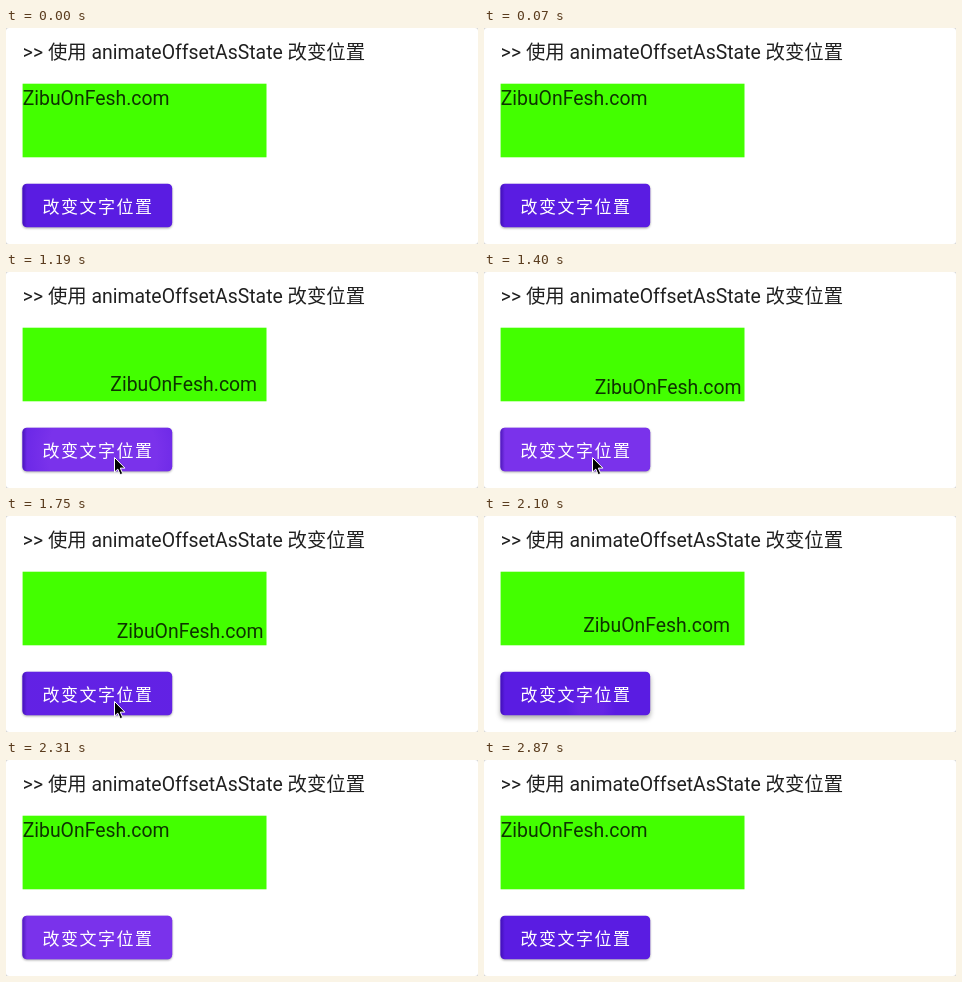
These frames come from a looping animation (472x216 px, 3.43 s). An HTML page:

```html
<!DOCTYPE html>
<html lang="zh-CN">
<head>
<meta charset="utf-8">
<title>animateOffsetAsState</title>
<style>
html, body { margin: 0; width: 100%; height: 100%; overflow: hidden; background: #d4d4d4; }
svg { display: block; width: 472px; height: 216px; }
text { font: 19.4px Roboto, "Noto Sans CJK SC", "Noto Sans CJK", sans-serif; fill: #202020; white-space: pre; }
#mover { fill: #000; fill-opacity: .8; }
#box { filter: blur(.5px); }
.label { font-size: 17px; letter-spacing: 1.52px; fill: #fff; }
</style>
</head>
<body>
<svg viewBox="0 0 472 216">
  <defs>
    <radialGradient id="glow">
      <stop offset=".5" stop-color="#9a48f4"/>
      <stop offset="1" stop-color="#9a48f4" stop-opacity="0"/>
    </radialGradient>
    <linearGradient id="edge">
      <stop offset="0" stop-color="#30089a" stop-opacity=".6"/>
      <stop offset=".03" stop-color="#30089a" stop-opacity="0"/>
    </linearGradient>
    <clipPath id="shape"><rect x="16.4" y="155.8" width="149.8" height="43.4" rx="4.5"/></clipPath>
  </defs>
  <rect width="472" height="216" rx="3" fill="#fff"/>
  <text x="16.8" y="30.7">&gt;&gt; 使用 animateOffsetAsState 改变位置</text>
  <rect id="box" x="16.6" y="55.7" width="243.9" height="73.6" fill="#43ff00"/>
  <text id="mover" x="16.7" y="76.6">ZibuOnFesh.com</text>
  <rect id="button" x="16.4" y="155.8" width="149.8" height="43.4" rx="4.5" fill="#5a1ce2"/>
  <g clip-path="url(#shape)">
    <circle id="ripple" fill="url(#glow)"/>
    <rect x="16.4" y="155.8" width="149.8" height="43.4" fill="url(#edge)"/>
  </g>
  <text class="label" x="36.4" y="184.8">改变文字位置</text>
  <path id="cursor" transform="translate(108.5 185.5)" fill="#000" stroke="#fff" stroke-width="1"
    d="M0 0V14.6L3.3 11.6L5.7 17.2L8.2 16.1L5.8 10.6H10.4Z"/>
</svg>
<script>
const LOOP = 3430, STEP = 70;
const PRESS_OUT = 1050, PRESS_BACK = 2100;
const MOVE = { x: 94, y: 45.4 };
const $ = id => document.getElementById(id);
const [mover, button, ripple, cursor] = ['mover', 'button', 'ripple', 'cursor'].map($);
const clamp = v => Math.min(1, Math.max(0, v));
const mix = (a, b, k) => a + (b - a) * k;

// Critically damped spring, settling once close enough.
function spring(s) {
  if (s < 0) return 0;
  const u = 0.6 + s * 0.027;
  const left = (1 + u) * Math.exp(-u);
  return left < 0.015 ? 1 : 1 - left;
}

function drawPress(s) {
  const active = s >= 0;
  const lift = active ? clamp(1 - s / 140) : 0;
  button.style.filter =
    `drop-shadow(0 ${mix(1, 3, lift)}px ${mix(1, 2.6, lift)}px rgba(0,0,0,.34))`;

  const grow = clamp(s / 210);
  const fade = clamp((s + 50) / 140) * clamp((770 - s) / 280);
  ripple.setAttribute('cx', mix(107, 91, grow));
  ripple.setAttribute('cy', mix(191, 177, grow));
  ripple.setAttribute('r', mix(25, 150, grow));
  ripple.setAttribute('opacity', active ? 0.5 * fade : 0);
}

function draw(time) {
  const t = Math.floor((time % LOOP) / STEP) * STEP;
  const k = spring(t - PRESS_OUT) - spring(t - PRESS_BACK);
  mover.setAttribute('transform', `translate(${MOVE.x * k} ${MOVE.y * k})`);
  drawPress(t - (t < PRESS_BACK ? PRESS_OUT : PRESS_BACK));
  cursor.setAttribute('visibility', t >= 1120 && t < 1960 ? 'visible' : 'hidden');
}

const start = performance.now();
function tick() {
  draw(performance.now() - start);
  requestAnimationFrame(tick);
}
tick();
</script>
</body>
</html>
```
